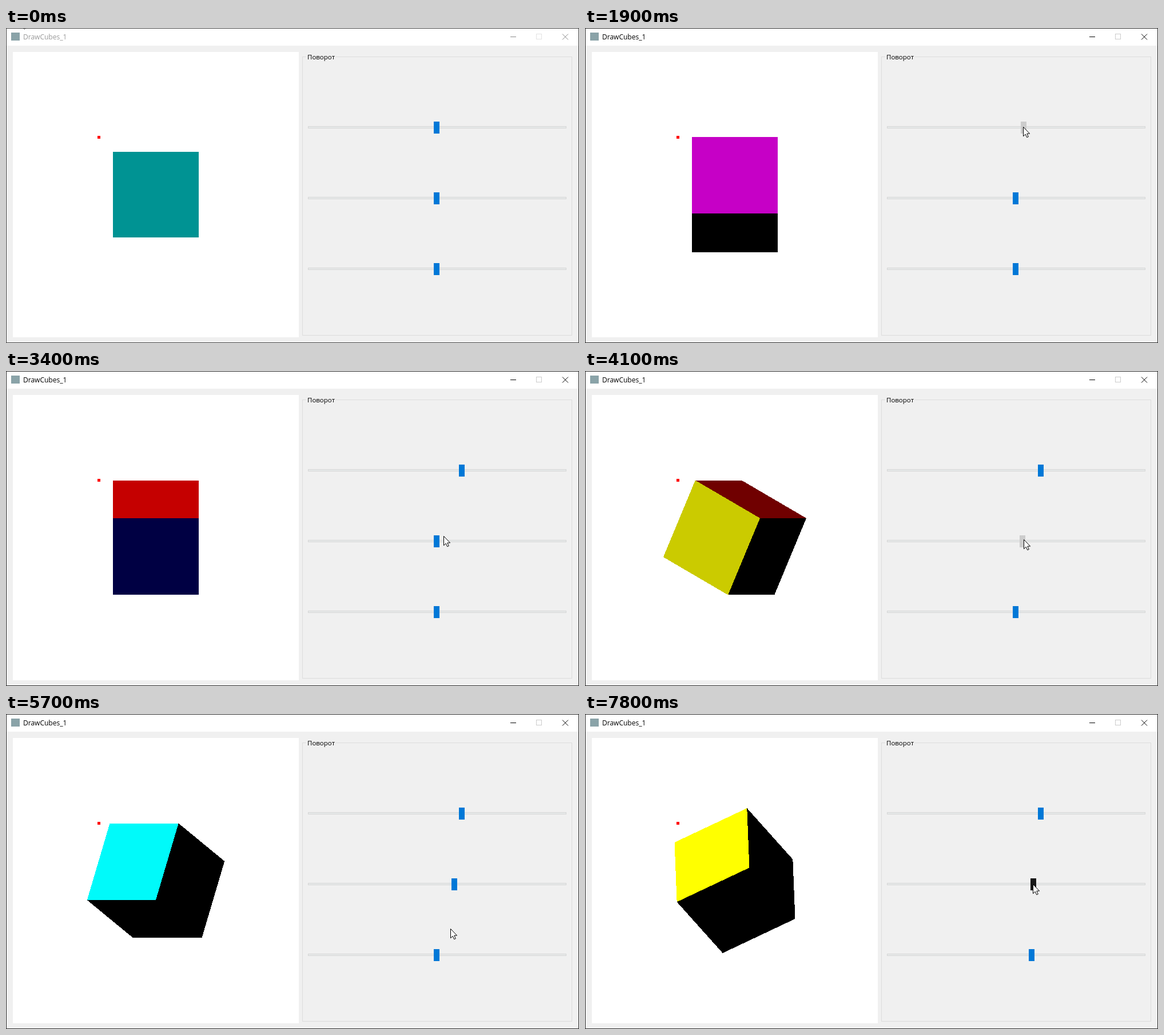
An HTML page for the animation above (8 s loop, 1002x552 px).

```html
<!DOCTYPE html>
<html lang="ru">
<head>
<meta charset="utf-8">
<title>DrawCubes_1</title>
<style>
  html, body { margin: 0; width: 100%; height: 100%; overflow: hidden; background: #f0f0f0; }
  svg { display: block; width: 1002px; height: 552px; }
  text { font-family: "Open Sans", "Noto Sans", sans-serif; }
  .crisp { shape-rendering: crispEdges; }
</style>
</head>
<body>
<svg id="stage" viewBox="0 0 1002 552" xmlns="http://www.w3.org/2000/svg">
  <rect width="1002" height="552" fill="#f0f0f0"/>
  <rect width="1002" height="31" fill="#fff"/>
  <rect id="edge" class="crisp" x=".5" y=".5" width="1001" height="551" fill="none"/>
  <rect x="9" y="8" width="15" height="14" fill="#8aa3a8"/>
  <text id="caption" x="30" y="20" font-size="12">DrawCubes_1</text>
  <g id="buttons" fill="none">
    <path class="crisp" d="M882 15.5h10"/>
    <path d="M973 10.5l10 10M983 10.5l-10 10"/>
  </g>
  <rect id="maximize" class="crisp" x="927.5" y="10.5" width="9" height="9" fill="none"/>

  <rect x="12" y="42" width="500" height="500" fill="#fff"/>
  <g id="cube" class="crisp"></g>
  <rect x="160" y="189" width="5" height="5" fill="#f00"/>

  <path class="crisp" d="M525 50.5H518.5V538.5H989.5V50.5H577" fill="none" stroke="#dcdcdc"/>
  <text x="527" y="55" font-size="11.5">Поворот</text>
  <g id="sliders" class="crisp"></g>
  <path id="cursor" d="M.5 .5V16.7L4.2 13.2L6.7 18.7L9.3 17.6L6.8 12.1H11.6Z" fill="#fff" stroke="#000"/>
</svg>
<script>
const LOOP = 8000, STEP = 100;
const CENTER = { x: 262, y: 292 }, HALF = 75;
const HANDLE = { x: 748, w: 10, h: 21 }, PX_PER_UNIT = 442 / 360;

// Slider values: [time, value]
const sliders = [
  { top: 164, grip: 4, press: [1200, 3100],
    keys: [[1300, 0], [1400, 1], [1500, 3], [1600, 3], [2500, 26], [2800, 33], [2900, 33], [3000, 36]] },
  { top: 288, grip: 7, press: [3600, 5200],
    keys: [[3600, 0], [3800, 2], [4100, 10], [4200, 10], [4600, 19], [4800, 23], [5000, 25]] },
  { top: 412, grip: 9, press: [6000, 7400],
    keys: [[6000, 0], [6500, 11], [6800, 19], [6900, 19], [7300, 23]] }
];

// Pointer path: [time, x, y]
const path = [
  [0, 25, -17], [100, 48, -2], [400, 330, 80], [700, 779, 192], [800, 762, 180],
  [900, 750, 172], [1000, 752, 172], [1400, 753, 172], [2500, 784, 174], [3000, 796, 175],
  [3100, 795, 178], [3200, 788, 205], [3400, 765, 289], [3500, 757, 294], [3600, 755, 295],
  [5100, 786, 295], [5200, 800, 255], [5300, 815, 214], [5400, 805, 290], [5500, 781, 363],
  [5600, 781, 363], [5700, 777, 376], [5900, 758, 418], [6000, 757, 420], [6500, 771, 416],
  [7300, 785, 414], [7400, 784, 413], [7500, 784, 413], [7600, 785, 360], [7700, 784, 308],
  [7800, 783, 298]
];

// Faces: axis, side and colour channels
const faces = [
  { axis: 2, side: 1, rgb: [0, 1, 1] },
  { axis: 2, side: -1, rgb: [0, 0, 1] },
  { axis: 1, side: -1, rgb: [1, 0, 1] },
  { axis: 1, side: 1, rgb: [1, 0, 0] },
  { axis: 0, side: -1, rgb: [1, 1, 0] },
  { axis: 0, side: 1, rgb: [0, 1, 0] }
];

const $ = id => document.getElementById(id);

function add(parent, tag, attrs) {
  const el = document.createElementNS("http://www.w3.org/2000/svg", tag);
  set(el, attrs);
  parent.appendChild(el);
  return el;
}

function set(el, attrs) {
  for (const name in attrs) el.setAttribute(name, attrs[name]);
}

function sample(keys, t) {
  if (t <= keys[0][0]) return keys[0].slice(1);
  const i = keys.findIndex(k => k[0] > t);
  if (i < 0) return keys[keys.length - 1].slice(1);
  const a = keys[i - 1], b = keys[i];
  const f = (t - a[0]) / (b[0] - a[0]);
  return a.slice(1).map((v, n) => v + (b[n + 1] - v) * f);
}

const turn = (p, q, angle) => [
  p * Math.cos(angle) + q * Math.sin(angle),
  q * Math.cos(angle) - p * Math.sin(angle)
];

function rotate([x, y, z], [a, b, c]) {
  [y, z] = turn(y, z, a);
  [x, z] = turn(x, z, b);
  [x, y] = turn(x, y, c);
  return [x, y, z];
}

for (const face of faces) face.el = add($("cube"), "polygon", {});

for (const s of sliders) {
  add($("sliders"), "rect", {
    x: 528.5, y: s.top + 8.5, width: 451, height: 3, fill: "#e7eaea", stroke: "#d6d6d6"
  });
  s.el = add($("sliders"), "rect", { y: s.top, width: HANDLE.w, height: HANDLE.h });
}

function drawCube(angles) {
  for (const { axis, side, rgb, el } of faces) {
    const normal = [0, 0, 0];
    normal[axis] = side;
    const n = rotate(normal, angles);
    if (n[2] < 1e-6) {
      el.setAttribute("visibility", "hidden");
      continue;
    }
    const corners = [[-1, -1], [1, -1], [1, 1], [-1, 1]].map(([u, v]) => {
      const p = [0, 0, 0];
      p[axis] = side;
      p[(axis + 1) % 3] = u;
      p[(axis + 2) % 3] = v;
      const r = rotate(p, angles);
      return (CENTER.x + HALF * r[0]).toFixed(2) + "," + (CENTER.y + HALF * r[1]).toFixed(2);
    });
    // Light comes from the upper left, in front of the cube
    const light = Math.max(0, (n[2] - n[0] - n[1]) / Math.sqrt(3));
    const color = rgb.map(v => Math.round(v * light * 255));
    set(el, { visibility: "visible", points: corners.join(" "), fill: `rgb(${color})` });
  }
}

function render(time) {
  const t = Math.floor(time / STEP) * STEP;
  const active = t >= 1200;
  let [x, y] = sample(path, t);

  for (const s of sliders) {
    s.value = Math.round(sample(s.keys, t)[0]);
    s.x = HANDLE.x + Math.round(s.value * PX_PER_UNIT);
    s.held = t >= s.press[0] && t < s.press[1];
    if (s.held) x = s.x + s.grip;
  }
  x = Math.round(x);
  y = Math.round(y);

  for (const s of sliders) {
    const over = x >= s.x && x < s.x + HANDLE.w && y >= s.top && y < s.top + HANDLE.h;
    set(s.el, { x: s.x, fill: s.held ? "#ccc" : over ? "#171717" : "#0078d7" });
  }

  drawCube(sliders.map(s => s.value / 10));
  set($("cursor"), { transform: `translate(${x} ${y})` });
  set($("caption"), { fill: active ? "#000" : "#999" });
  set($("buttons"), { stroke: active ? "#000" : "#888" });
  set($("maximize"), { stroke: active ? "#ccc" : "#e3e3e3" });
  set($("edge"), { stroke: active ? "#2b2b2b" : "#434343" });
}

const start = performance.now();
function loop() {
  render((performance.now() - start) % LOOP);
  requestAnimationFrame(loop);
}
loop();
</script>
</body>
</html>
```
